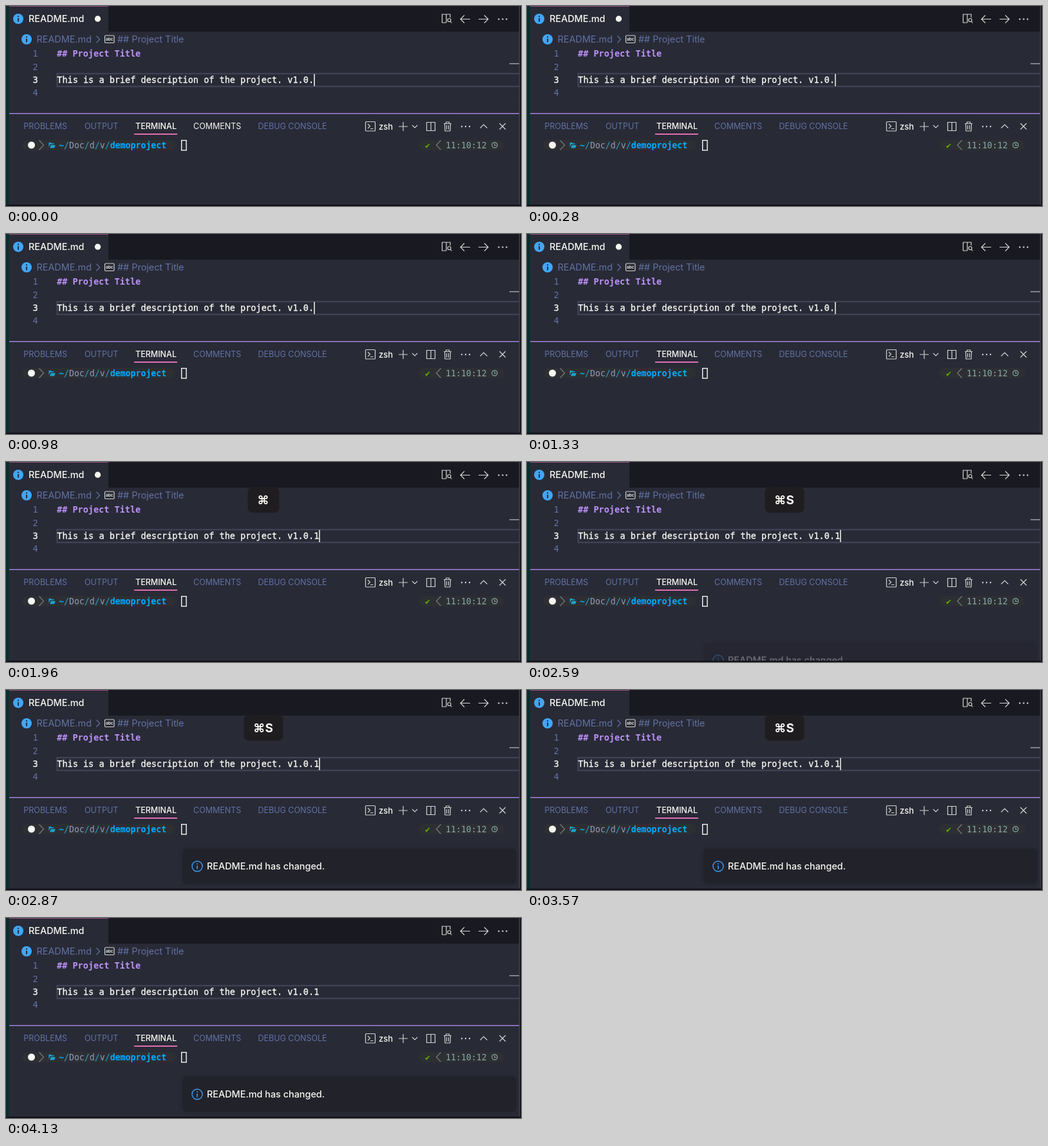
An HTML page for the animation above (4.2 s loop, 800x312 px).

```html
<!DOCTYPE html>
<html lang="en">
<head>
<meta charset="utf-8">
<title>Editor save notification</title>
<style>
  html, body { margin: 0; width: 100%; height: 100%; overflow: hidden; background: #282a36; }
  svg { display: block; width: 800px; height: 312px; }
  text { white-space: pre; }

  .ui { font: 500 14.4px Inter, "Open Sans", sans-serif; }
  .crumb { font-weight: 400; }
  .panel-tab { font: 400 12.5px Inter, "Open Sans", sans-serif; }
  .code { font: 13.52px "DejaVu Sans Mono", monospace; }
  .term { font: 13.22px "DejaVu Sans Mono", monospace; }
  .keys text { font: 700 19px Inter, "DejaVu Sans", sans-serif; text-anchor: middle; }
  .bold { font-weight: 700; }
  .heavy { stroke: #f8f8f2; stroke-width: .35; }

  .white { fill: #f8f8f2; }
  .muted { fill: #6272a4; }
  .line { fill: none; stroke: #d4d4d0; stroke-width: 1.2; }

  /* One loop is 4200 ms; a 70 ms tick is 1.667%. */
  .hover, .caret, .caret-move, .typed, .unsaved, .cmd, .cmd-s, .toast {
    animation: 4.2s step-end infinite;
  }
  .hover { animation-name: hover; }
  .caret { animation-name: blink; }
  .caret-move { animation-name: advance; }
  .typed { animation-name: typed; }
  .unsaved { animation-name: unsaved; }
  .cmd { animation-name: cmd; }
  .cmd-s { animation-name: cmd-s; }
  .toast { animation-name: toast; }

  @keyframes hover { 0% { fill: #f8f8f2; } 1.65%, 100% { fill: #6272a4; } }
  @keyframes blink {
    0% { opacity: 1; } 11.65% { opacity: 0; }
    23.3% { opacity: 1; } 34.98% { opacity: 0; }
    43.3% { opacity: 1; } 54.98% { opacity: 0; }
    59.98% { opacity: 1; } 71.65% { opacity: 0; }
    84.98% { opacity: 1; } 96.65%, 100% { opacity: 0; }
  }
  @keyframes advance { 0% { transform: none; } 43.3%, 100% { transform: translateX(8px); } }
  @keyframes typed { 0% { opacity: 0; } 43.3%, 100% { opacity: 1; } }
  @keyframes unsaved { 0% { opacity: 1; } 59.98%, 100% { opacity: 0; } }
  @keyframes cmd { 0% { opacity: 0; } 46.65% { opacity: 1; } 58.3%, 100% { opacity: 0; } }
  @keyframes cmd-s {
    0% { opacity: 0; }
    58.3% { opacity: 1; }
    91.65% { opacity: 1; animation-timing-function: linear; }
    97.5%, 100% { opacity: 0; }
  }
  @keyframes toast {
    0% { opacity: 0; transform: translateY(54px); }
    59.98% { opacity: 0; transform: translateY(54px); animation-timing-function: ease-out; }
    67.12%, 100% { opacity: 1; transform: none; }
  }
</style>
</head>
<body>
<svg viewBox="0 0 800 312">
  <defs>
    <g id="info">
      <circle r="8" fill="#42a5f5"/>
      <path d="M0-1V4.5M0-4.7V-2.7" stroke="#282a36" stroke-width="2"/>
    </g>
    <g id="dots" fill="#d4d4d0">
      <circle cx="-6" r="1.2"/><circle r="1.2"/><circle cx="6" r="1.2"/>
    </g>
    <filter id="shadow" x="-5%" y="-30%" width="110%" height="160%">
      <feDropShadow dx="0" dy="0" stdDeviation="3" flood-color="#000" flood-opacity=".16"/>
    </filter>
  </defs>

  <!-- Window -->
  <rect width="800" height="312" fill="#282a36"/>
  <rect x="159" width="639" height="40" fill="#191a21"/>
  <rect x="5" width="154" height="1" fill="#94527e"/>

  <!-- File tab -->
  <use href="#info" x="19" y="20"/>
  <text class="ui white" x="35" y="25.300">README.md</text>
  <circle class="unsaved white" cx="142.500" cy="20" r="4.700"/>

  <!-- Editor actions -->
  <g class="line">
    <path d="M684 26H677.500V13H690V18M684 13V26"/>
    <circle cx="688.500" cy="22" r="2.500"/>
    <path d="M690.300 24l2 2.500"/>
    <path d="M721 20.500H706M712 14.500l-6 6 6 6"/>
    <path d="M734 20.500H749M743 14.500l6 6-6 6"/>
  </g>
  <use href="#dots" x="771.500" y="20.500"/>

  <!-- Breadcrumbs -->
  <use href="#info" x="32" y="52"/>
  <text class="ui crumb muted" x="47.500" y="57.300">README.md</text>
  <path class="line" d="M140.500 46.500l5 5.500-5 5.500" style="stroke:#6272a4"/>
  <rect class="line" x="153.500" y="46" width="14.500" height="11.500" rx="1.500"/>
  <text class="white" x="160.750" y="54.300" font-family="Inter, sans-serif" font-size="6.500" font-weight="600" text-anchor="middle">abc</text>
  <text class="ui crumb muted" x="173" y="57.300">## Project Title</text>

  <!-- Editor -->
  <path d="M798 105.500H79.500V125.500H798" fill="none" stroke="#44475a" stroke-width="2"/>
  <rect x="782" y="89" width="16" height="2" fill="#80818a"/>
  <g class="code">
    <g class="muted">
      <text x="41.500" y="79">1</text>
      <text x="41.500" y="99.500">2</text>
      <text x="41.500" y="140">4</text>
    </g>
    <text class="white heavy" x="41.500" y="120">3</text>
    <text class="bold" x="79" y="79" fill="#bd93f9">## Project Title</text>
    <text class="white heavy" x="79.300" y="120">This is a brief description of the project. v1.0.</text>
    <text class="typed white heavy" x="478.200" y="120">1</text>
  </g>
  <g class="caret-move">
    <rect class="caret" x="478" y="106" width="2" height="19" fill="#c4c4c0"/>
  </g>

  <!-- Panel header -->
  <rect x="5" y="167" width="793" height="1.400" fill="#ad88e5"/>
  <g class="panel-tab muted">
    <text x="27.300" y="192.400">PROBLEMS</text>
    <text x="122" y="192.400">OUTPUT</text>
    <text class="white" x="201" y="192.400" font-weight="500">TERMINAL</text>
    <text class="hover" x="291" y="192.400">COMMENTS</text>
    <text x="391.500" y="192.400">DEBUG CONSOLE</text>
  </g>
  <rect x="199" y="199" width="67" height="1.700" fill="#ff79c6"/>
  <g class="line">
    <rect x="558.500" y="180.500" width="15" height="14.500" rx="1"/>
    <path d="M562 184l3.500 3.500-3.500 3.500M566 191.500h4.500"/>
    <path d="M610 188h14M617 181v14M631 186l4 4 4-4"/>
    <path d="M653.500 181.500h13v13h-13zM660 181.500v13"/>
    <path d="M680 183.500h12M683.500 183.500v-2.500h5v2.500M681.500 183.500l.5 11.500h8l.5-11.500M684.500 186v6.500M687.500 186v6.500"/>
    <path d="M736.500 190.500l5.500-5.500 5.500 5.500M766.500 183l9.500 9.500M776 183l-9.500 9.500"/>
  </g>
  <use href="#dots" x="714" y="188"/>
  <text class="ui white" x="579" y="193" style="font-size:13px">zsh</text>

  <!-- Terminal -->
  <g fill="#2d2f33">
    <rect x="25" y="209" width="238" height="16" rx="8"/>
    <rect x="641" y="209" width="133" height="16" rx="8"/>
  </g>
  <circle cx="39.500" cy="217" r="5.500" fill="#f8f8f2"/>
  <path class="line" d="M51.500 209.500l7 7.500-7 7.500M675.500 209.500l-7 7.500 7 7.500" style="stroke:#777a7c"/>
  <path d="M66.500 220.500V213h3.500l1 1.300h3.500v1.500h-6zM68 221.500l1.800-4.500h7l-1.800 4.500z" fill="#1ba3d0"/>
  <text class="term" x="82" y="222" fill="#22a4d4"><tspan class="bold" fill="#00afff">~</tspan>/<tspan fill="#949bbd">Doc</tspan>/<tspan fill="#949bbd">d</tspan>/<tspan fill="#949bbd">v</tspan>/<tspan class="bold" fill="#00afff">demoproject</tspan></text>
  <rect class="line" x="272.700" y="209.600" width="7.400" height="15.500" style="stroke:#f8f8f2;stroke-width:1.400"/>
  <text class="term" x="651" y="222" fill="#5faf00">✔</text>
  <text class="term" x="683" y="222" fill="#89a8a8">11:10:12</text>
  <g class="line" style="stroke:#89a8a8">
    <circle cx="759" cy="217" r="4.200"/>
    <path d="M759 214.500v3h2.500"/>
  </g>

  <!-- Notification -->
  <g class="toast">
    <rect x="274" y="247.500" width="518.500" height="55" rx="8" fill="#20212b" filter="url(#shadow)"/>
    <circle cx="297" cy="275" r="8" fill="none" stroke="#3b9df5" stroke-width="1.400"/>
    <path d="M297 274v5.500M297 270.300v2" stroke="#3b9df5" stroke-width="1.600"/>
    <text class="ui white" x="312" y="280">README.md has changed.</text>
  </g>

  <!-- Pressed keys -->
  <g class="keys">
    <g class="cmd">
      <rect x="375.500" y="39" width="49" height="40" rx="8" fill="#1f1d20"/>
      <text class="white" x="399.500" y="65.500">⌘</text>
    </g>
    <g class="cmd-s">
      <rect x="369.500" y="39" width="61" height="40" rx="8" fill="#1f1d20"/>
      <text class="white" x="399.500" y="65.500">⌘S</text>
    </g>
  </g>

  <!-- Desktop edges -->
  <rect width="4.500" height="312" fill="#07302f"/>
  <rect x="797" width="1" height="312" fill="#4c4d58"/>
  <rect x="798" width="2" height="312" fill="#15161e"/>
  <rect y="310" width="800" height="2" fill="#0e0f17"/>
</svg>
</body>
</html>
```
